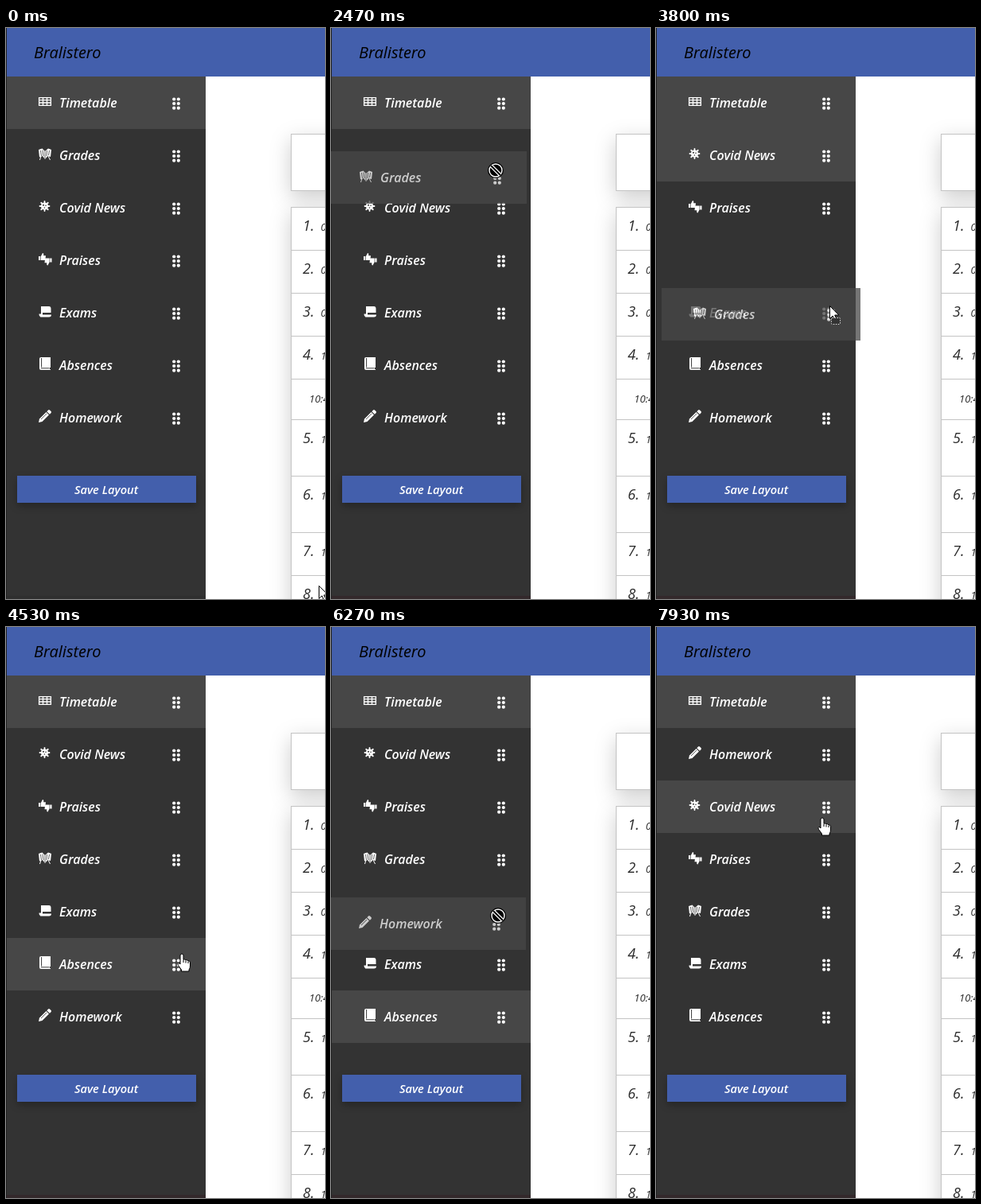
Write an HTML page that moves like this. It is 401 px wide and 718 px high and loops after 8000 ms.

```html
<!DOCTYPE html>
<html lang="en">
<head>
<meta charset="utf-8">
<title>Sortable menu</title>
<style>
  html, body { margin: 0; width: 100%; height: 100%; overflow: hidden; background: #fff; }
  svg { display: block; width: 401px; height: 718px; }
  text { font-family: "Open Sans", "Noto Sans", sans-serif; font-style: italic; }
  .label { font-size: 16px; font-weight: 600; fill: #fff; }
  .card { fill: #fff; stroke: #c4c4c4; filter: drop-shadow(0 8px 13px rgba(0, 0, 0, .2)); }
  .num { font-size: 18px; font-weight: 500; fill: #2b2b2b; }
  .time { font-size: 13px; fill: #2b2b2b; }
  .button { fill: #435fac; filter: drop-shadow(0 4px 5px rgba(0, 0, 0, .28)); }
  .icon { fill: #fff; stroke: none; }
  .line { fill: none; stroke: #fff; }
  .cut { fill: none; stroke: #3a3a3a; }
  .pointer { fill: #fff; stroke: #000; stroke-linejoin: round; }
</style>
</head>
<body>
<svg viewBox="0 0 401 718">
  <rect class="card" x="358.5" y="133.5" width="80" height="71"/>
  <rect class="card" x="358.5" y="225.5" width="80" height="540"/>
  <g id="list"></g>
  <rect width="401" height="61" fill="#435fac"/>
  <text x="35" y="38" font-size="20">Bralistero</text>
  <rect y="61" width="251" height="657" fill="#333"/>
  <rect id="strip" x="1" y="714" width="250" height="4"/>
  <rect width="1" height="718" fill="#222"/>
  <rect class="button" x="14" y="563" width="225" height="34"/>
  <text class="label" x="126" y="586" text-anchor="middle" style="font-size:14.7px">Save Layout</text>
  <g id="rows"></g>
  <g id="cursor">
    <g id="arrow">
      <path class="pointer" d="M.5 .5V16.5L4.2 13L6.8 18.8L9.2 17.8L6.7 12H11.8Z"/>
      <rect id="box" x="2.5" y="15.5" width="11" height="8" rx="1" fill="#333" stroke="#ddd" stroke-dasharray="1.5 1.5"/>
    </g>
    <g id="no" transform="translate(0 2)">
      <circle r="10"/>
      <circle r="8" fill="none" stroke="#fff" stroke-width="1.4"/>
      <path d="M-5.4 -5.4L5.4 5.4" stroke="#fff" stroke-width="4.4"/>
      <path d="M-6 -6L6 6" stroke="#000" stroke-width="2"/>
    </g>
    <g id="hand">
      <path class="pointer" d="M-2 2Q-2 0 0 0Q2 0 2 2V7.5Q4 6 5 8Q7 7 8 9Q10.5 8 10.5 11V15Q10.5 18 9 20V22H-.5V20L-4.5 14.5Q-6 12 -4 11.5Q-3 11.5 -2 13Z"/>
      <path d="M2 8V11M5 8.5V11.5M8 9.5V12" stroke="#000" fill="none"/>
    </g>
  </g>
</svg>
<script>
const LOOP = 8000, STEP = 1000 / 15, TOP = 61, ROW = 66;
const BASE = '#333', LIT = '#474747';
const $ = id => document.getElementById(id);

const thumb = 'M0 4H2.2V9H0ZM2.8 4.2L5 0Q6.6 0 6.2 3.2H9L8.3 9H2.8Z';
const spikes = [...Array(8).keys()].map(i =>
  `<path class="line" stroke-width="1.8" stroke-linecap="round" transform="rotate(${i * 45} 48.5 31)" d="M48.5 31V25"/>`).join('');

// Icons share the row's coordinates.
const items = [
  ['Timetable', '<path class="line" stroke-width="1.3" d="M41.6 26.6H56.4V36.4H41.6ZM41.6 29.6H56.4M41.6 33H56.4M46.5 26.6V36.4M51.5 26.6V36.4"/>'],
  ['Grades', `<path class="icon" d="M41 26L45.5 24.5L49 28L53 24.5L57 26L56 35L52.5 34L49 38L46 34L42 35.5Z"/>
    <path class="cut" stroke-width=".8" d="M43.5 27L44.5 34M46 26.5L47 34M49 28V37M51.5 27L51 34M54.5 27L53.5 33"/>
    <path class="line" d="M44 34L42.5 39M53 34L55.5 39"/>`],
  ['Covid News', spikes + `<circle class="icon" cx="48.5" cy="31" r="4.6"/>
    <g fill="#333"><circle cx="47" cy="29.7" r="1"/><circle cx="50" cy="30.3" r=".8"/><circle cx="48.4" cy="33" r=".8"/></g>`],
  ['Praises', `<path class="icon" transform="translate(41 24)" d="${thumb}"/>
    <path class="icon" transform="translate(57.5 39.5) rotate(180)" d="${thumb}"/>`],
  ['Exams', `<path class="icon" d="M44 25H54Q56.5 25 56.5 28V33H46V35Q46 38 44 38Q41.5 38 41.5 34.5H44Z"/>
    <path class="icon" d="M44 35.5H57Q57 38.5 54 38.5H43Z"/><path class="cut" d="M46.5 34.2H56"/>`],
  ['Absences', `<path class="icon" d="M44 23H56V36H55V38H56V39H44Q42 39 42 37V25Q42 23 44 23Z"/>
    <path class="cut" d="M44 36.8H54.5M44.6 24V35.5"/>`],
  ['Homework', `<path class="icon" d="M41 39L42 34.5L50.5 26L54 29.5L45.5 38Z"/>
    <path class="icon" d="M51.3 25.2L53 23.5Q54 22.6 55 23.5L56.6 25.1Q57.4 26 56.6 27L54.9 28.7Z"/>
    <path class="cut" stroke-width=".8" d="M44 35L51 28"/>`]
];

const dots = [28.5, 34, 39.7].map(y => [211.2, 216.8].map(x =>
  `<circle class="icon" cx="${x}" cy="${y}" r="2.1"/>`).join('')).join('');

function makeGroup(parent, html) {
  const g = document.createElementNS('http://www.w3.org/2000/svg', 'g');
  g.innerHTML = html;
  parent.append(g);
  return g;
}

const rows = items.map(([name, icon]) => makeGroup($('rows'),
  `<rect x="1" width="250" height="${ROW}"/>${icon}<text class="label" x="67" y="39">${name}</text>${dots}`));

// Lesson list: baseline of each line, then the rules between them
[255, 309, 363, 417, 522, 593, 664, 718].forEach((y, i) => makeGroup($('list'),
  `<text class="num" x="373" y="${y}">${i + 1}.</text><text class="time" x="395.5" y="${y}">${i < 3 ? '08:00' : '11:00'}</text>`));
makeGroup($('list'), '<text class="time" x="381" y="471">10:45</text>');
makeGroup($('list'), [279, 333, 387, 441, 492, 563, 634, 688].map(y =>
  `<path d="M359 ${y}.5H401" stroke="#c4c4c4"/>`).join(''));

// Pointer path: time, x, y
const path = [
  [4, 393, 701], [270, 238, 418], [2465, 238, 418],
  [2466, 207, 177], [2800, 210, 205], [3200, 216, 279], [3270, 216, 288], [3410, 216, 288],
  [3720, 218, 349], [3810, 218, 349], [4000, 221, 330], [4270, 217, 287],
  [4520, 221, 408], [4800, 219, 452], [5130, 217, 474], [5470, 218, 474], [5730, 216, 474],
  [5870, 215.5, 478], [6190, 209.5, 361], [6280, 209.5, 361], [6670, 205, 224],
  [7130, 203, 128], [7270, 203.5, 128], [7404, 203.5, 148], [7471, 203.5, 154], [7600, 205, 160],
  [7930, 209, 240], [8000, 209, 240]
];

// Each drag: when, which row, where it was held, and the slot it opens over time
const drags = [
  { start: 2466, end: 4266, item: 1, from: 1, hold: [212, 22], slots: [[2466, 1], [2930, 2], [3530, 3]] },
  { start: 5866, end: 7599, item: 6, from: 6, hold: [215.5, 21],
    slots: [[5866, 6], [6060, 5], [6190, 4], [6480, 3], [6600, 2], [6860, 2], [6930, 1]] }
];

function pointer(t) {
  const i = Math.max(1, path.findIndex(k => k[0] >= t));
  const [t0, x0, y0] = path[i - 1], [t1, x1, y1] = path[i];
  const p = Math.min(1, Math.max(0, (t - t0) / (t1 - t0)));
  return [x0 + (x1 - x0) * p, y0 + (y1 - y0) * p];
}

const rowAt = y => Math.floor((y - TOP) / ROW);
const show = (id, on) => $(id).setAttribute('visibility', on ? 'visible' : 'hidden');
const move = (el, x, y) => el.setAttribute('transform', `translate(${x} ${y})`);

function draw(t) {
  const order = items.map((_, i) => i);
  let active = null, slot = -1;
  for (const d of drags) {
    if (t < d.start) break;
    slot = d.slots.filter(s => s[0] <= t).pop()[1];
    order.splice(order.indexOf(d.item), 1);
    order.splice(slot, 0, d.item);
    if (t < d.end) active = d;
  }

  const [x, y] = pointer(t);
  let kind = t < drags[0].start ? 'arrow' : 'hand';
  if (active) kind = rowAt(y) === slot ? 'no' : 'move';
  const lit = active ? active.from : kind === 'hand' ? rowAt(y) : 0;

  order.forEach((id, i) => {
    const row = rows[id], held = active && active.item === id;
    row.firstChild.setAttribute('fill', held || i === 0 || i === lit ? LIT : BASE);
    row.setAttribute('opacity', held ? .75 : 1);
    if (!held) return move(row, 0, TOP + i * ROW);
    // The held row trails the pointer by one step.
    const [gx, gy] = pointer(Math.max(active.start, t - STEP));
    move(row, Math.round(gx - active.hold[0]), Math.round(gy - active.hold[1]));
    if (row.nextSibling) row.parentNode.append(row);
  });

  move($('cursor'), Math.round(x), Math.round(y));
  show('arrow', kind === 'arrow' || kind === 'move');
  show('box', kind === 'move');
  show('no', kind === 'no');
  show('hand', kind === 'hand');
  $('strip').setAttribute('fill', t < 66 ? '#2f2f2f' : '#33292b');
}

const begin = performance.now();
function tick() {
  const t = (performance.now() - begin) % LOOP;
  draw(Math.floor((t + 4) / STEP) * STEP + 4);
  requestAnimationFrame(tick);
}
tick();
</script>
</body>
</html>
```
